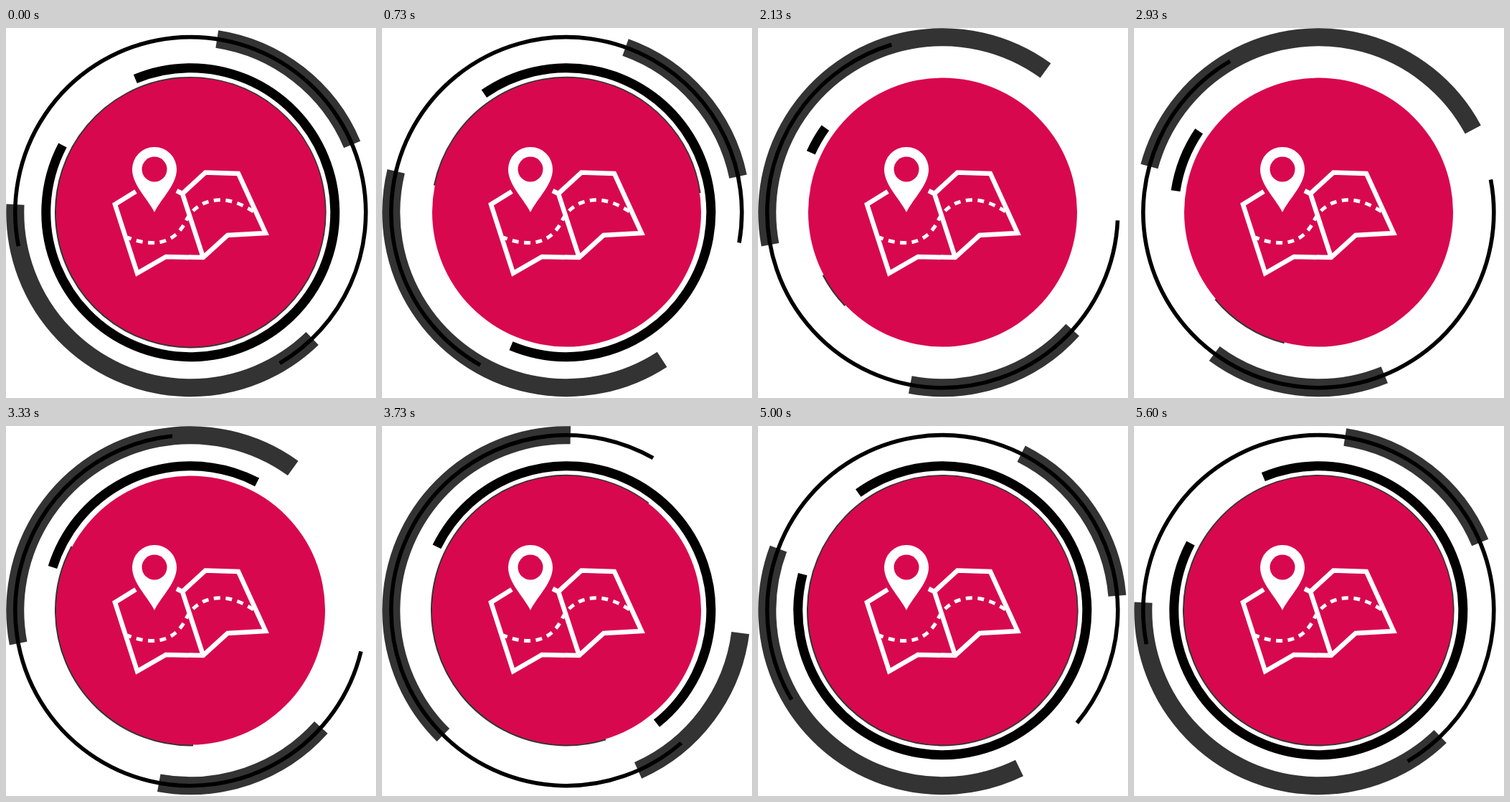
An HTML page that plays this animation: 516x516 px, repeating every 5630 ms.

```html
<!DOCTYPE html>
<html lang="en">
<head>
<meta charset="utf-8">
<title>Map badge</title>
<style>
  html, body { margin: 0; width: 100%; height: 100%; overflow: hidden; background: #fff; }
  svg { display: block; width: 100vw; height: 100vh; }
</style>
</head>
<body>
<svg viewBox="0 0 516 516">
  <g id="rings" fill="none"></g>
  <circle cx="257.5" cy="257" r="187.5" fill="#d8084e"/>
  <g fill="none" stroke="#fff" stroke-width="6.500">
    <path d="M181 228 152 246 183 342 223 319 275 320 309 289 362 286 324 203 278 201.500 246 231 275 320M238 227 246 231"/>
    <path d="M169 292C199 304 232 305 250 271C264 240 302 227 345 256" stroke-width="5" stroke-dasharray="9 7.500" stroke-dashoffset="3"/>
  </g>
  <path d="M207 257C197 237 176 219 176 197A31 31 0 0 1 238 197C238 219 217 237 207 257Z" fill="#fff"/>
  <circle cx="207" cy="197" r="17.500" fill="#d8084e"/>
</svg>
<script>
const LOOP = 5630, FPS = 25, STEPS = 140;
const CX = 257.3, CY = 257.2;

function ring(radius, width, color) {
  const el = document.createElementNS('http://www.w3.org/2000/svg', 'circle');
  const attrs = { cx: CX, cy: CY, r: radius, stroke: color, 'stroke-width': width, pathLength: 360 };
  for (const name in attrs) el.setAttribute(name, attrs[name]);
  document.getElementById('rings').append(el);
  // Angles in degrees, clockwise from three o'clock.
  return (start, span) => {
    el.setAttribute('stroke-dasharray', span >= 360 ? 'none' : `${span} ${360 - span}`);
    el.setAttribute('transform', `rotate(${start} ${CX} ${CY})`);
  };
}

// Smooth curve through the points that never overshoots them.
function curve(points) {
  const last = points.length - 1;
  const slope = i => (points[i + 1][1] - points[i][1]) / (points[i + 1][0] - points[i][0]);
  const tangent = points.map((p, i) => {
    if (i === 0 || i === last) return 0;
    const a = slope(i - 1), b = slope(i);
    return a * b <= 0 ? 0 : 2 * a * b / (a + b);
  });
  return x => {
    let i = 0;
    while (i < last - 1 && x > points[i + 1][0]) i++;
    const [x0, y0] = points[i], [x1, y1] = points[i + 1];
    const w = x1 - x0, u = (x - x0) / w, v = 1 - u;
    return y0 * v * v * (1 + 2 * u) + y1 * u * u * (1 + 2 * v)
      + w * u * v * (tangent[i] * v - tangent[i + 1] * u);
  };
}

function ease(x, from, to) {
  const u = Math.min(1, Math.max(0, (x - from) / (to - from)));
  return (1 - Math.cos(Math.PI * u)) / 2;
}

const shortBand = ring(244.5, 25, '#333');
const longBand = ring(244.5, 25, '#333');
const hairline = ring(244.5, 5.6, '#000');
const innerBand = ring(201.5, 13, '#000');
const rim = ring(188, 2.6, '#333');

const bandTurn = curve([[0, 0], [15, 6.5], [33, 62.2], [45, 97], [53, 123.4], [60, 142.5],
  [67, 154], [73, 149.2], [93, 88.7], [105, 54], [125, 18], [135, 2.6], [STEPS, 0]]);
const hairTurn = curve([[0, 0], [33, -110.9], [53, -166.3], [66, -183], [73, -179.7],
  [93, -119.8], [125, -19.5], [STEPS, 0]]);

function draw(ms) {
  const tick = Math.floor((ms % LOOP + 4) * 30 / 1000);
  const step = Math.min(STEPS, Math.floor(tick * FPS / 30 + 1e-6));

  const turn = bandTurn(step);
  shortBand(turn - 81.3, 58.5);
  longBand(turn + 46, 136.6);
  hairline(168.9 + hairTurn(step), 250.5);

  // The inner band swings at constant speed, turning at steps 2 and 72.
  const swing = 70 - Math.abs(70 - Math.abs(step - 72));
  const open = 1 - ease(step, 2.4, 47.4) + ease(step, 66.8, 111.8);
  innerBand(187.7 + 0.88 * swing, 11.4 + 308.8 * open);

  const rimOpen = 1 - ease(step, 2, 31) + ease(step, 66, 112);
  rim(220 - 1.58 * step, 16 + 344 * rimOpen);
}

const begin = performance.now();
function frame() {
  draw(performance.now() - begin);
  requestAnimationFrame(frame);
}
draw(0);
requestAnimationFrame(frame);
</script>
</body>
</html>
```
